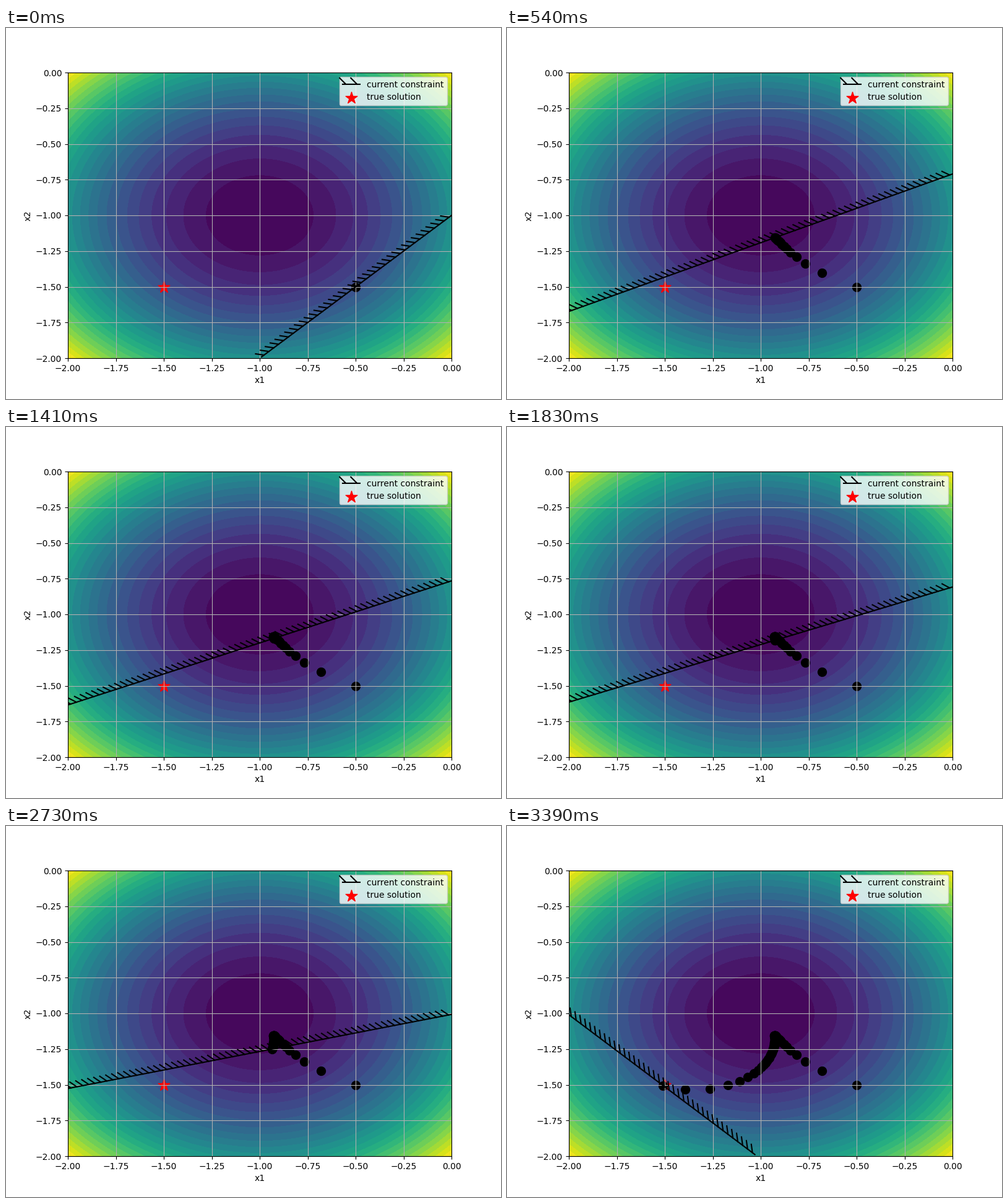
These frames come from a looping animation (800 by 600 pixels, 3420 ms). A matplotlib script:

```python
import numpy as np
import matplotlib.pyplot as plt
from matplotlib import patheffects
from matplotlib.animation import FuncAnimation

FRAMES, INTERVAL = 114, 30
CENTER = np.array([-1.0, -1.0])


def constraint_normals():
    """Normals n of the lines n . x = 1, one row per step."""
    t = np.arange(FRAMES)

    # Slow drift of n1 - n2: speeds up, then settles near zero
    drift = np.empty(FRAMES)
    drift[0] = 2.187
    for i in range(1, FRAMES):
        w = drift[i - 1]
        drift[i] = w - 0.21 * np.exp(-1.69 * w) * np.tanh(w / 0.15)

    # Quick decay of the first steps on top of the drift
    diff = drift - 0.187 * 0.61 ** t
    gap = (0.26 + 0.076 * np.exp(-2.2 * drift)
           + 0.24 * 0.4 ** t + 0.5 * 0.8 ** t)
    return np.column_stack([gap - 1 + diff, gap - 1 - diff]) / 2


normals = constraint_normals()

# The constrained minimum is the projection of the centre on the line
offset = (1 - normals @ CENTER) / (normals ** 2).sum(axis=1)
solutions = CENTER + normals * offset[:, None]

fig, ax = plt.subplots(figsize=(8, 6), dpi=100)
grid = np.linspace(-2, 0, 100)
X1, X2 = np.meshgrid(grid, grid)
ax.contourf(X1, X2, (X1 + 1) ** 2 + (X2 + 1) ** 2,
            levels=np.linspace(0, 2, 26))
star = ax.scatter([-1.5], [-1.5], s=200, c="red", marker="*",
                  label="true solution")
trail = ax.scatter([], [], s=100, c="black")
line, = ax.plot([], [], color="black", label="current constraint",
                path_effects=[patheffects.withTickedStroke(spacing=7,
                                                           angle=135)])
ax.set(xlim=(-2, 0), ylim=(-2, 0), xlabel="x1", ylabel="x2")
ax.grid(True)
ax.legend(handles=[line, star], loc="upper right")


def draw(i):
    n1, n2 = normals[i]
    y = (1 - n1 * grid) / n2
    inside = (y >= -2) & (y <= 0)
    line.set_data(grid[inside], y[inside])
    trail.set_offsets(solutions[:i + 1])
    return line, trail


anim = FuncAnimation(fig, draw, frames=FRAMES, interval=INTERVAL,
                     repeat=True, repeat_delay=0)
plt.show()
```
